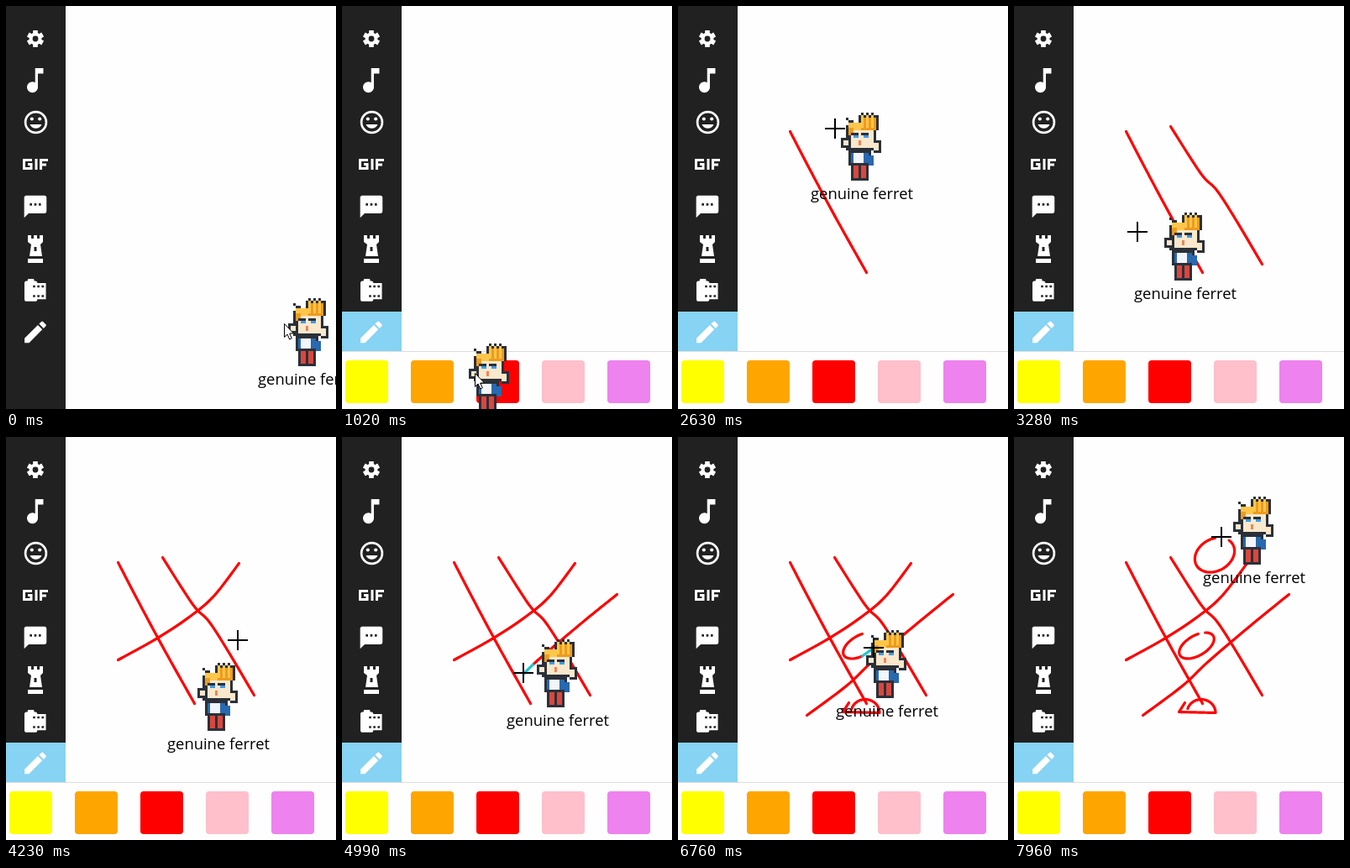
Write an HTML page that moves like this. It is 393 px wide and 480 px high and loops after 8000 ms.

```html
<!DOCTYPE html>
<html lang="en">
<head>
<meta charset="utf-8">
<title>Shared drawing board</title>
<style>
  html, body { margin: 0; width: 100%; height: 100%; overflow: hidden; background: #fefefe; }
  svg { display: block; }
  #name { font: 18.4px "Open Sans", "Noto Sans", sans-serif; text-anchor: middle; }
  #ink, #wet { fill: none; stroke: red; stroke-width: 3.2; stroke-linecap: round; stroke-linejoin: round; }
  #wet { stroke: #20c5cf; }
  #sprite { shape-rendering: crispEdges; }
</style>
</head>
<body>
<svg width="393" height="480" viewBox="0 0 393 480">
  <rect width="71" height="480" fill="#212121"/>
  <rect id="active" y="364" width="71" height="47" fill="#87d3f3"/>
  <g fill="#fff">
    <g transform="translate(35 39)">
      <path d="M0-10V10M-8.7-5L8.7 5M-8.7 5L8.7-5" stroke="#fff" stroke-width="5.6"/>
      <circle r="7.4"/><circle r="3.4" fill="#212121"/>
    </g>
    <path transform="translate(15.3 69.2) scale(1.62)" d="M12 3v10.6c-.6-.4-1.3-.6-2-.6-2.2 0-4 1.8-4 4s1.8 4 4 4 4-1.8 4-4V7h4V3z"/>
    <g transform="translate(35.5 138.5)">
      <circle r="12.4" fill="none" stroke="#fff" stroke-width="2.7"/>
      <circle cx="-4.7" cy="-4" r="2.1"/><circle cx="4.7" cy="-4" r="2.1"/>
      <path d="M-7 2.5H7a7.5 7.5 0 0 1-14 0z"/>
    </g>
    <path d="M31 183.5H21.5V193.5H30V188.5H26M36 182V195M41.5 195V183.5H50M41.5 189H48" fill="none" stroke="#fff" stroke-width="3"/>
    <path transform="translate(19 223) scale(1.33)" fill-rule="evenodd" d="M20 2H4q-2 0-2 2v18l4-4h14q2 0 2-2V4q0-2-2-2zM7 9h2v2H7zM11 9h2v2h-2zM15 9h2v2h-2z"/>
    <path fill-rule="evenodd" d="M26 273h4v4h3v-4h4v4h3v-4h4v8l-3 3 2 14H28l2-14-4-3zM33.5 287v5h3v-5zM26 301h18v5H26z"/>
    <path transform="translate(19.4 323.7) scale(1.28)" fill-rule="evenodd" d="M14 5q0-2-2-2h-1V2q0-1-1-1H6Q5 1 5 2v1H4q-2 0-2 2v15q0 2 2 2h8q2 0 2-2h8V5zM10 7h2v2h-2zM14 7h2v2h-2zM18 7h2v2h-2zM10 16h2v2h-2zM14 16h2v2h-2zM18 16h2v2h-2z"/>
    <path transform="translate(17.8 371.2) scale(1.43)" d="M3 17.2V21h3.8L17.8 9.9l-3.7-3.7zM20.7 7q.7-.7 0-1.4l-2.3-2.3q-.7-.7-1.4 0l-1.9 1.8 3.8 3.8z"/>
  </g>
  <path id="ink" transform="translate(.5 .5)"/>
  <path id="wet" transform="translate(.5 .5)"/>
  <g id="palette">
    <rect y="411" width="393" height="69" fill="#fefefe"/>
    <path d="M0 411.5H393" stroke="#ddd"/>
  </g>
  <g id="avatar">
    <g id="sprite" transform="translate(-25 0) scale(3)"></g>
    <text id="name" y="103">genuine ferret</text>
  </g>
  <path id="cross" d="M-12 0H12M0-12V12" stroke="#000" stroke-width="2"/>
  <path id="arrow" d="M.5.5V16.5L4 13l2.7 6 2.6-1.2L6.7 12H11.5z" fill="#fff" stroke="#000"/>
</svg>
<script>
const LOOP = 8000, LAG = 60, HOP = 320;
const $ = id => document.getElementById(id);
const box = (parent, fill, x, y, width, height, rx = 0) => {
  const el = document.createElementNS('http://www.w3.org/2000/svg', 'rect');
  Object.entries({ fill, x, y, width, height, rx }).forEach(a => el.setAttribute(...a));
  $(parent).append(el);
};

['yellow', 'orange', 'red', 'pink', 'violet'].forEach((fill, i) =>
  box('palette', fill, 4 + 78 * i, 422, 51, 51, 4));

// Figure in cells of 3 px, painted back to front.
const cell = (fill, x, y, w = 1, h = 1) => box('sprite', fill, x, y, w, h);
const DARK = '#2b3038', SKIN = '#fae8cc', GOLD = '#ffc64a', AMBER = '#ee9b1f', BLUE = '#2869b0';
cell(DARK, 7, 1, 8, 6);
cell(DARK, 2, 5, 12, 10);
cell(DARK, 0, 10, 3, 4);
cell(DARK, 13, 11, 3, 5);
cell(DARK, 3, 15, 9, 6);
cell(DARK, 4, 20, 7, 7);
cell(SKIN, 4, 7, 9, 7);
cell(SKIN, 1, 11, 2, 2);
cell(SKIN, 13, 12, 2, 3);
cell(GOLD, 3, 4, 7, 3);
cell(AMBER, 3, 6, 2, 3);
cell(DARK, 2, 2);
cell(DARK, 3, 3, 2);
for (let x = 8; x < 14; x += 2) {
  cell(DARK, x, 0);
  cell(AMBER, x, 2, 2, 5);
  cell(GOLD, x, 1, 1, 5);
}
cell(BLUE, 4, 16, 7, 4);
cell(BLUE, 11, 17, 2, 4);
cell('#f2f5fa', 5, 16, 4, 4);
for (const x of [5, 9]) {
  cell(DARK, x - 1, 8, 3);
  cell('#419ae8', x, 9, 2);
}
cell('#ee8459', 7, 11, 1, 2);
for (const x of [5, 8]) cell('#d9473f', x, 21, 2, 5);

// Shapes map progress 0..1 to a point.
const curve = (...pts) => f => {
  const n = pts.length - 1, i = Math.min(n - 1, Math.floor(f * n)), u = f * n - i;
  return [0, 1].map(k => {
    const [a, b, c, d] = [i - 1, i, i + 1, i + 2].map(j => pts[Math.max(0, Math.min(n, j))][k]);
    return b + u / 2 * (c - a + u * (2 * a - 5 * b + 4 * c - d + u * (3 * (b - c) + d - a)));
  });
};
const ring = (cx, cy, rx, ry, tilt, from, to) => f => {
  const rad = Math.PI / 180, a = (from + (to - from) * f) * rad, r = tilt * rad;
  const x = rx * Math.cos(a), y = ry * Math.sin(a);
  return [cx + x * Math.cos(r) - y * Math.sin(r), cy + x * Math.sin(r) + y * Math.cos(r)];
};

// The whole session is a chain of quick moves and steady strokes.
const start = [330.5, 378];
const legs = [{ t0: 0, t1: 1, path: () => start }];
const move = (t0, t1, x, y) => {
  const [x0, y0] = legs.at(-1).path(1);
  legs.push({ t0, t1, path(f) {
    const e = 1 - (1 - f) ** 3;
    return [x0 + (x - x0) * e, y0 + (y - y0) * e];
  } });
};
const stroke = (leave, t0, t1, path) => {
  move(leave, Math.min(t0, leave + HOP), ...path(0));
  legs.push({ t0, t1, path, ink: true });
};

move(60, 180, 333, 370);
move(370, 680, 45, 391);
move(900, 1140, 160, 438);
move(1190, 1370, 176, 440);
stroke(1550, 2030, 2330, curve([133, 149], [158, 197], [187, 251], [224, 317]));
stroke(2450, 2770, 3163, curve([186, 143], [222, 199], [241, 219], [263, 253], [295, 307]));
stroke(3163, 3483, 3880, curve([133, 265], [180, 239], [219, 213], [247, 189], [277, 150]));
move(3920, 4190, 185, 340);
stroke(4199, 4640, 5300, curve([327, 187], [285, 221], [232, 266], [200, 296], [153, 331]));
stroke(5330, 5480, 5530, curve([203, 316], [196, 327]));
move(5530, 5620, 223, 367);
stroke(5620, 5820, 5960, ring(222.5, 328, 17, 16, 0, 0, -162));
stroke(5960, 6010, 6100, curve([196, 327], [239, 328]));
stroke(6100, 6500, 6960, ring(217, 248, 23, 12, -30, -68, -404));
stroke(6960, 7320, 7840, ring(238.5, 140, 25, 19, -30, -65, -380));
move(7840, 7950, 256.5, 100);
move(7960, 8020, 247, 119);

const progress = (leg, t) => Math.max(0, Math.min(1, (t - leg.t0) / (leg.t1 - leg.t0)));
const at = t => {
  const leg = legs.findLast(l => l.t0 <= t);
  return leg.path(progress(leg, t));
};
const trace = (path, f) => 'M' + Array.from({ length: 33 }, (_, i) => path(f * i / 32)).join('L');

const show = (id, on) => $(id).setAttribute('visibility', on ? 'visible' : 'hidden');
const place = (id, x, y) => $(id).setAttribute('transform', `translate(${Math.round(x)} ${Math.round(y)})`);

function draw(t) {
  const [x, y] = at(t), [cx, cy] = at(t + LAG);
  const strokes = legs.filter(l => l.ink);
  $('ink').setAttribute('d', strokes.filter(s => t > s.t0).map(s => trace(s.path, progress(s, t))).join(''));
  // The newest bit of a stroke stays wet between the avatar and the pointer.
  const wet = strokes.some(s => t >= s.t0 - LAG && t < s.t1);
  $('wet').setAttribute('d', wet ? `M${x},${y}L${cx + .1},${cy}` : '');

  show('active', t >= 740);
  show('palette', t >= 860);
  place('avatar', x + 30, y - 30);
  const arrow = cy > 335;
  show('arrow', arrow);
  show('cross', !arrow);
  place(arrow ? 'arrow' : 'cross', cx, cy);
}

function tick() {
  draw(performance.now() % LOOP);
  requestAnimationFrame(tick);
}
tick();
</script>
</body>
</html>
```
